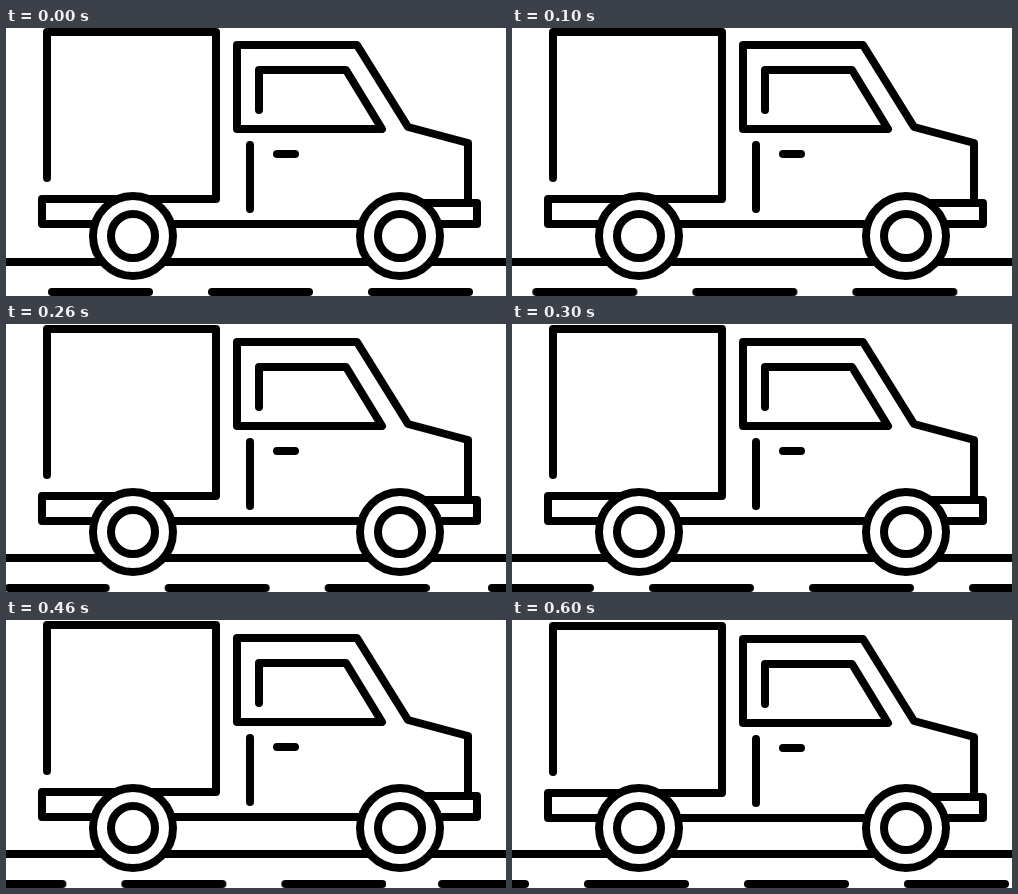
Animation, 500 px wide and 268 px high, one loop 700 ms. Source, as an HTML page:

```html
<!DOCTYPE html>
<html lang="en">
<head>
<meta charset="utf-8">
<title>Delivery van</title>
<style>
  html, body { margin: 0; width: 100%; height: 100%; overflow: hidden; background: #fff; }
  svg { display: block; width: 500px; height: 268px; }
  .ink { fill: none; stroke: #000; stroke-width: 8; stroke-linecap: round; stroke-linejoin: round; }
  .wheel { fill: #fff; }

  .dashes { animation: drive 700ms steps(7, jump-none) infinite; }
  .next { animation: enter 700ms step-end infinite; }
  .body { animation: sink 700ms step-end infinite; }

  @keyframes drive {
    to { transform: translateX(-130px); }
  }
  /* The incoming dash runs a little faster, then falls into line. */
  @keyframes enter {
    0% { transform: translateX(0); animation-timing-function: steps(5, end); }
    71.4286% { transform: translateX(-125px); }
    85.7143%, 100% { transform: translateX(-140px); }
  }
  @keyframes sink {
    0% { transform: translateY(0); }
    28.5714% { transform: translateY(1px); }
    71.4286%, 100% { transform: translateY(2px); }
  }
</style>
</head>
<body>
<svg viewBox="0 0 500 268">
  <defs>
    <g id="wheel">
      <circle r="40"/>
      <circle r="22"/>
    </g>
  </defs>
  <g class="ink">
    <path d="M-10 234H510"/>
    <path class="dashes" d="M46 264h97M206 264h97M366 264h97"/>
    <path class="next" d="M536 264h97"/>
    <g class="body">
      <path d="M41 150V4H210V171H36V196H471V175H410"/>
      <path d="M253 82V42H340L376 101H231V17H351L402 99L462 115V175"/>
      <path d="M244 117V181M271 126H289"/>
    </g>
    <g class="wheel">
      <use href="#wheel" x="127" y="208"/>
      <use href="#wheel" x="394" y="208"/>
    </g>
  </g>
</svg>
</body>
</html>
```
